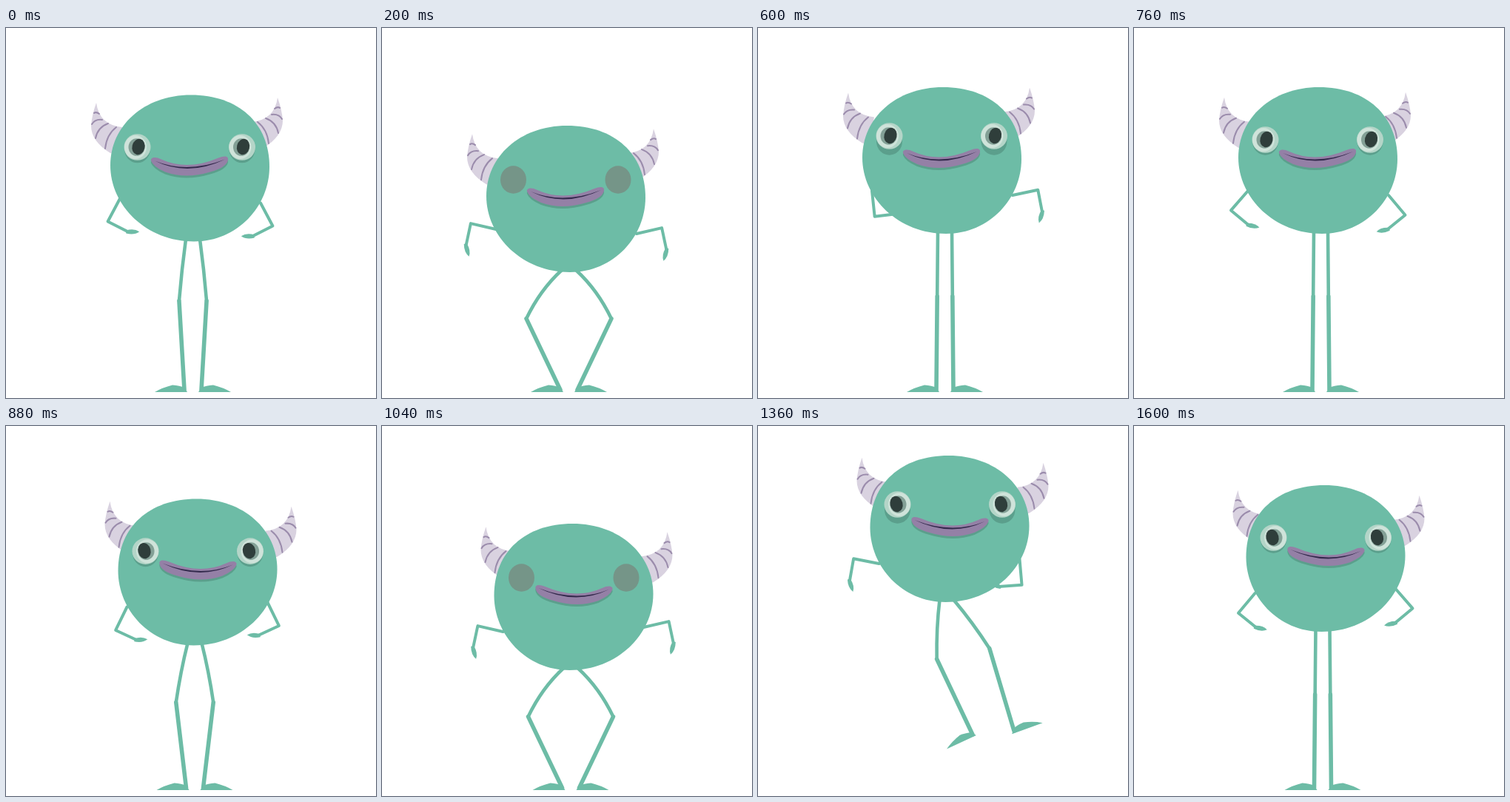
Recreate the animation shown at these times as an HTML page with a canvas. Size 500 by 500 pixels, loop 1.68 s.

```html
<!DOCTYPE html>
<html lang="en">
<head>
<meta charset="utf-8">
<title>Jumping monster</title>
<style>
  html, body { margin: 0; width: 100%; height: 100%; overflow: hidden; background: #fff; }
  canvas { display: block; width: 500px; height: 500px; }
</style>
</head>
<body>
<canvas id="stage" width="500" height="500"></canvas>
<script>
(() => {
  const ctx = document.getElementById('stage').getContext('2d');
  const HALF = 840, STEP = 40, MIRROR = 507.5, RAD = Math.PI / 180;
  const STAND = 80, UPPER_ARM = 35, FOREARM = 31;
  const SKIN = '#6dbca6', SHADE = '#5b9f8c', LID = '#759588';
  const HORN = '#d9d2e0', STRIPE = '#9b8cac', LIP = '#9480a6', DARK = '#33294c';

  // Smooth cyclic track through [time, value] keys, without overshoot.
  function track(...keys) {
    const n = keys.length;
    const time = i => keys[(i + n) % n][0] + HALF * Math.floor(i / n);
    const val = i => keys[(i + n) % n][1];
    const rate = i => (val(i + 1) - val(i)) / (time(i + 1) - time(i));
    const slope = i => {
      const a = rate(i - 1), b = rate(i);
      return a * b > 0 ? 2 * a * b / (a + b) : 0;
    };
    return t => {
      let i = n - 1;
      while (i >= 0 && time(i) > t) i--;
      const h = time(i + 1) - time(i), u = (t - time(i)) / h, v = 1 - u;
      return v * v * (1 + 2 * u) * val(i) + u * u * (3 - 2 * u) * val(i + 1)
        + h * u * v * (v * slope(i) - u * slope(i + 1));
    };
  }

  // A value that rests on the ground and passes two poses in the air.
  const flight = (rest, peak, fall) => track([240, rest], [360, peak], [520, fall], [600, rest]);

  const bodyTop = track([40, 98.5], [200, 132], [360, 11], [520, 40], [600, STAND], [680, 96], [760, STAND]);
  const eyeHeight = track([0, 70.5], [200, 72], [360, 69], [520, 66], [600, 66], [760, 71]);
  const tuck = flight(0, 1, 0.35);
  const arms = [
    { side: -1, x: 154, y: 140, swing: track([0, 28], [40, 26], [200, 103], [360, 27], [520, 5], [600, -6], [760, 41]) },
    { side: 1, x: 344, y: 146, swing: track([0, 28], [40, 26], [200, 103], [360, 59], [520, 101], [600, 102], [760, 40]) }
  ];
  const legs = [
    { side: -1, hip: 243, bend: 47, x: flight(241, 218, 161.5), y: flight(489, 365, 412), tilt: flight(0, 8, 20) },
    { side: 1, hip: 262, bend: 65, x: flight(264, 219, 217.5), y: flight(489, 339, 417), tilt: flight(0, 43, 25) }
  ];

  const body = new Path2D('M250 0C314 0 356 38 356 97C356 150 313 198 254 198C190 198 141 150 141 95C141 42 186 0 250 0Z');
  const horn = new Path2D('M122 12Q126 42 157 45L150 82L141 80Q115 64 115 43Q116 29 122 12Z');
  const stripes = new Path2D('M119 26Q122 24 126 27M116 41Q120 34 130 35M121 60Q124 45 138 40M134 74Q136 55 149 45');
  const lips = new Path2D('M196 89C195 84 202 83 210 87Q245 103 287 85C295 82 301 82 300 88Q298 98 276 104Q243 114 215 104Q199 97 196 89Z');
  const smile = new Path2D('M201 89Q245 107 296 87Q246 111 201 89Z');
  const foot = new Path2D('M-4 3L40 3Q30 -3 16 -6.5Q6 -6 0 -3Z');
  const hand = new Path2D('M-3 -2Q8 -5 15 0Q8 5 -3 2Z');

  function fill(path, color) {
    ctx.fillStyle = color;
    ctx.fill(path);
  }

  function oval(x, y, rx, ry, color, turn = 0) {
    ctx.fillStyle = color;
    ctx.beginPath();
    ctx.ellipse(x, y, rx, ry, turn, 0, Math.PI * 2);
    ctx.fill();
  }

  function line(width, color, path) {
    ctx.lineWidth = width;
    ctx.strokeStyle = color;
    path ? ctx.stroke(path) : ctx.stroke();
  }

  function placed(x, y, turn, sx, paint) {
    ctx.save();
    ctx.translate(x, y);
    ctx.rotate(turn);
    ctx.scale(sx, 1);
    paint();
    ctx.restore();
  }

  // The elbow keeps a right angle; only the shoulder swings.
  function drawArm({ side, x, y, swing }, t) {
    const angle = swing(t);
    const dir = deg => [side * Math.sin(deg * RAD), Math.cos(deg * RAD)];
    const [ux, uy] = dir(angle), [fx, fy] = dir(angle - 91), [hx, hy] = dir(angle - 119);
    const ex = x + ux * UPPER_ARM, ey = y + uy * UPPER_ARM;
    const wx = ex + fx * FOREARM, wy = ey + fy * FOREARM;
    ctx.beginPath();
    ctx.moveTo(x, y);
    ctx.lineTo(ex, ey);
    ctx.lineTo(wx, wy);
    line(4, SKIN);
    placed(wx, wy, Math.atan2(hy, hx), 1, () => fill(hand, SKIN));
  }

  // The knee leaves the hip-ankle line when squatting or tucked.
  function drawLeg(leg, t, hy) {
    const { side, hip } = leg, ax = leg.x(t), ay = leg.y(t);
    const squat = Math.max(0, bodyTop(t) - STAND);
    const bend = 0.75 * squat + 0.003 * squat * squat + leg.bend * tuck(t);
    const dx = ax - hip, dy = ay - hy, len = Math.hypot(dx, dy);
    const nx = side * dy / len, ny = -side * dx / len;
    const kx = hip + dx * 0.41 + nx * bend, ky = hy + dy * 0.41 + ny * bend;
    ctx.beginPath();
    ctx.moveTo(hip, hy);
    ctx.quadraticCurveTo((hip + kx) / 2 + nx * bend * 0.12, (hy + ky) / 2 - bend * 0.12, kx, ky);
    line(4.6, SKIN);
    ctx.beginPath();
    ctx.moveTo(kx, ky);
    ctx.lineTo(ax, ay);
    line(5.6, SKIN);
    placed(ax, ay, leg.tilt(t) * RAD, side, () => fill(foot, SKIN));
  }

  function drawHorn() {
    fill(horn, HORN);
    line(2, STRIPE, stripes);
  }

  function drawEye(x, y, shut) {
    oval(x, 73, 17.5, 18.8, shut ? LID : SHADE);
    if (shut) return;
    oval(x, y, 18, 17.8, '#b4d5c8');
    oval(x - 2.5, y, 15, 16, '#cfe3da');
    oval(x - 1, y, 11, 11.8, '#83a096');
    oval(x + 1.5, y - 0.5, 8.5, 10.8, '#2f3e3b', 0.25);
  }

  function draw(ms) {
    const t = ms % HALF, y = bodyTop(t), eyeY = eyeHeight(t);
    const lag = 0.22 * (bodyTop((t + HALF - STEP) % HALF) - y);
    const shut = t >= 160 && t < 240;
    ctx.setTransform(1, 0, 0, 1, 0, 0);
    ctx.fillStyle = '#fff';
    ctx.fillRect(0, 0, 500, 500);
    if (ms >= HALF) ctx.setTransform(-1, 0, 0, 1, MIRROR, 0);
    ctx.lineCap = ctx.lineJoin = 'round';

    legs.forEach(leg => drawLeg(leg, t, y + 195));
    ctx.translate(0, y);
    arms.forEach(arm => drawArm(arm, t));
    placed(0, lag, 0, 1, drawHorn);
    placed(489, lag - 7, 0, -1, drawHorn);
    fill(body, SKIN);
    [177.5, 319].forEach(x => drawEye(x, eyeY, shut));
    placed(0, 3, 0, 1, () => fill(lips, SHADE));
    fill(lips, LIP);
    fill(smile, DARK);
  }

  const start = performance.now();
  function tick() {
    const ms = (performance.now() - start) % (2 * HALF);
    draw(Math.min(Math.floor(ms / STEP) * STEP, 1600));
    requestAnimationFrame(tick);
  }
  tick();
})();
</script>
</body>
</html>
```
